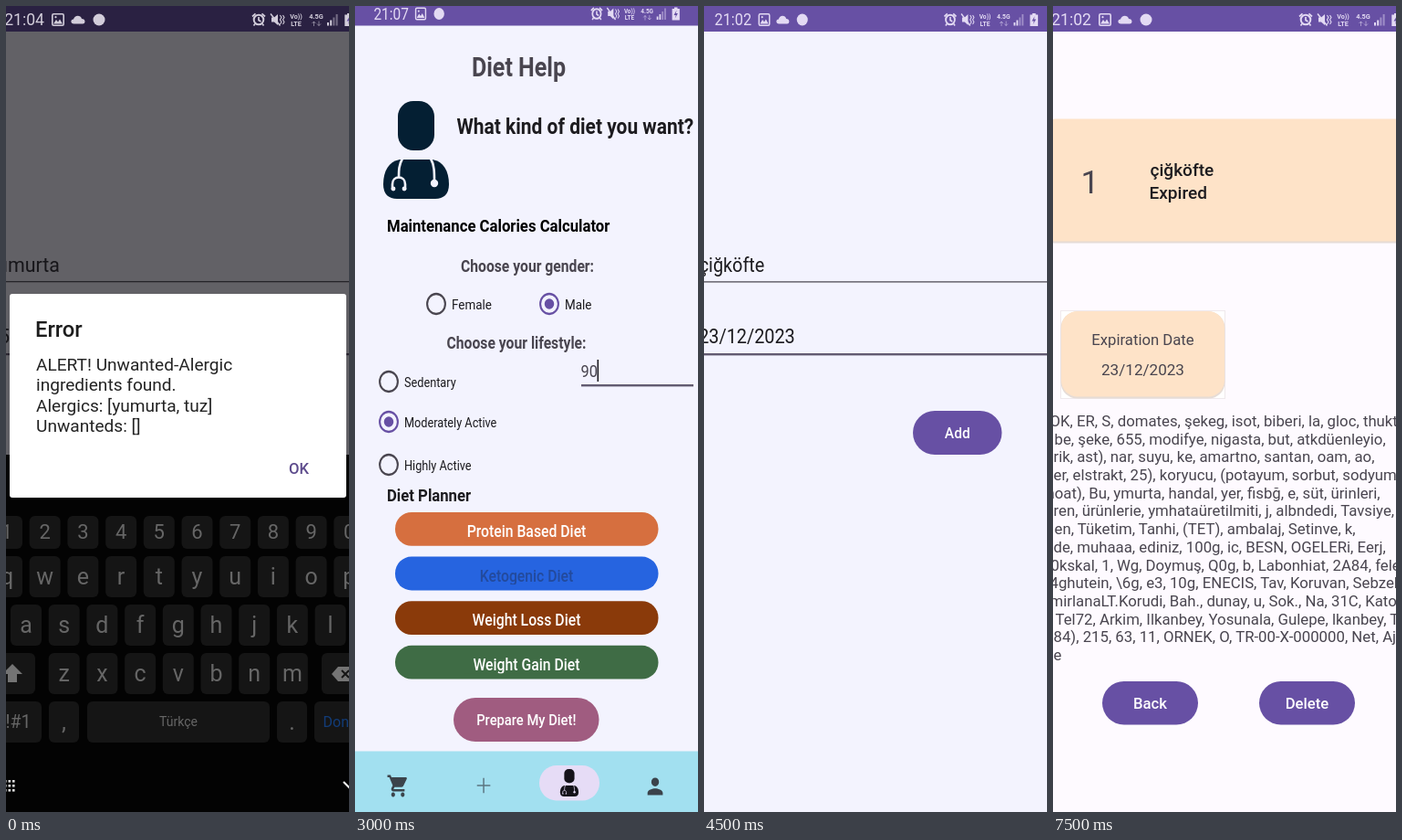
Recreate the animation shown at these times as an HTML page. Size 376x882 px, loop 8 s.

```html
<!DOCTYPE html>
<html lang="en">
<head>
<meta charset="utf-8">
<title>App screens</title>
<style>
html, body { margin: 0; width: 100%; height: 100%; overflow: hidden; background: #f3f3fe; }
svg { display: block; width: 376px; height: 882px; font-family: Roboto, sans-serif; }
text { white-space: pre; }
</style>
</head>
<body>
<svg id="stage" viewBox="0 0 376 882" xmlns="http://www.w3.org/2000/svg"></svg>
<script>
const PURPLE = '#6750a4', INK = '#1c1b1f', SOFT = '#49454f', PALE = '#f3f3fe', ROSE = '#fefaff';

// Horizontal scale of the screen being built
let sx = 1;

const rect = (x, y, w, h, fill, r = 0, more = '') =>
  `<rect x="${x}" y="${y}" width="${w}" height="${h}" rx="${r}" fill="${fill}" ${more}/>`;
const path = (d, fill, more = '') => `<path d="${d}" fill="${fill}" ${more}/>`;
const line = (d, color, w, more = '') =>
  path(d, 'none', `stroke="${color}" stroke-width="${w}" ${more}`);
const dot = (x, y, r, fill) => `<circle cx="${x}" cy="${y}" r="${r}" fill="${fill}"/>`;
const at = (x, y, kx, ky, body) => `<g transform="translate(${x} ${y}) scale(${kx} ${ky})">${body}</g>`;
const text = (x, y, size, str, fill = INK, weight = 400, anchor = 'start') =>
  at(x, y, sx, 1, `<text font-size="${size}" fill="${fill}" font-weight="${weight}" text-anchor="${anchor}">${str}</text>`);
const mid = (x, y, size, str, fill, weight) => text(x, y, size, str, fill, weight, 'middle');
const button = (x, y, w, h, label, size = 16.7, fill = PURPLE) =>
  rect(x, y, w, h, fill, h / 2) + mid(x + w / 2, y + h / 2 + size * .37, size, label, '#fff', 500);

const icons = {
  image: c => rect(-6.2, -6.2, 12.4, 12.4, 'none', 1.5, `stroke="${c}" stroke-width="1.6"`) +
    path('M-5 4.5L-2 0L0 2.5L2 -.5L5 4.5Z', c) + dot(-2.5, -2.8, 1.1, c),
  cloud: c => path('M-4.5 4.5C-8.5 4.5 -8.5 -.5 -5 -.5C-4 -5.5 3 -5.5 4 -1C8.5 -1 8.5 4.5 5 4.5Z', c),
  spot: c => dot(0, 0, 6.5, c),
  alarm: c => `<circle r="5.3" fill="none" stroke="${c}" stroke-width="2"/>` +
    line('M0 -3V.5L2.5 2M-7 -3.5L-3.5 -6.7M7 -3.5L3.5 -6.7M-4 4.5L-5.5 6.5M4 4.5L5.5 6.5', c, 1.7),
  mute: c => path('M-6 -2.5H-3L1 -6V6L-3 2.5H-6Z', c) +
    line('M-7 -6.5L3.5 6.5', c, 1.5) + line('M3.5 -5L5 -2.5L3.5 0L5 2.5L3.5 5M6.5 -5L8 -2.5L6.5 0L8 2.5L6.5 5', c, 1.1),
  volte: c => `<g font-size="7.2" font-weight="700" fill="${c}" text-anchor="middle"><text y="-.8">Vo))</text><text y="7">LTE</text></g>`,
  net: c => `<text y="-.6" font-size="7.4" font-weight="700" fill="${c}" text-anchor="middle">4.5G</text>` +
    line('M-2.5 7V2M-4.5 4L-2.5 2L-.5 4M3 1.5V6.5M1 4.5L3 6.5L5 4.5', c, .9, 'opacity=".6"'),
  signal: c => rect(-6, 3, 2, 3.5, c) + rect(-2.8, .5, 2, 6, c) +
    rect(.4, -2.5, 2, 9, c, 0, 'opacity=".45"') + rect(3.6, -6, 2, 12.5, c, 0, 'opacity=".45"'),
  battery: c => path('M-2 -7H2V-5.5H4.7V7H-4.7V-5.5H-2Z', c) + path('M1 -4L-2.5 1.5H0L-1 5L2.5 -.5H0Z', PURPLE)
};

function status(time, left, { off = 0, dy = 0, bar = PURPLE, color = '#e3daf3' } = {}) {
  const right = { alarm: 277, mute: 297, volte: 318, net: 340, signal: 358, battery: 376 };
  const put = ([name, x]) => at(off + sx * x, 15 + dy, sx, 1, icons[name](color));
  return rect(0, 0, 376, 28 + dy, bar) +
    text(off + sx * 42, 21 + dy, 17.6, time, color, 400, 'end') +
    Object.entries({ ...left, ...right }).map(put).join('');
}

function keyboard() {
  const KEY = '#151515', GLYPH = '#666';
  let out = rect(0, 491, 376, 391, '#030303');
  const key = (x, y, w, h, label, size = 25, c = GLYPH) =>
    rect(x, y, w, h, KEY, 6) + mid(x + w / 2, y + h / 2 + size * .34, size, label, c);
  const row = (chars, x, y, h, size) =>
    [...chars].forEach((ch, i) => out += key(x + i * 41.7 - 17, y, 34, h, ch, size));
  row('1234567890', 1, 558, 36, 22);
  row('qwertyuiop', 1, 602, 45);
  row('asdfghjkl', 22, 655, 45);
  row('zxcvbnm', 63.7, 708, 45);
  out += rect(-20, 708, 52, 45, KEY, 6) + path('M7 720L18 731H12V740H2V731H-4Z', '#747474');
  out += rect(346, 708, 50, 45, KEY, 6) + path('M357 731L364 723H384V739H364Z', '#747474') +
    line('M368 727L376 735M376 727L368 735', KEY, 2);
  out += rect(-20, 761, 59, 45, KEY, 6) + text(27.5, 790, 19.5, '!#1', GLYPH, 400, 'end');
  out += key(47, 761, 33, 45, ',') + key(89, 761, 200, 45, 'Türkçe', 14) + key(297, 761, 33, 45, '.');
  out += rect(338, 761, 60, 45, KEY, 6) + text(347.5, 789, 16, 'Done', '#123c78');
  for (let i = 0; i < 9; i++) out += rect(-2 + i % 3 * 4.5, 847 + (i / 3 | 0) * 5, 2.6, 2.6, '#ddd');
  return out + line('M370 849L377 856L384 849', '#eee', 2.2);
}

function alertScreen() {
  sx = 1;
  const body = ['ALERT! Unwanted-Alergic', 'ingredients found.', 'Alergics: [yumurta, tuz]', 'Unwanteds: []'];
  return rect(0, 0, 376, 882, '#626166') +
    status('21:04', { image: 57, cloud: 79, spot: 102 }, { bar: '#2a2142', color: '#d2cdda' }) +
    text(-20, 290.5, 21.4, 'yumurta', '#17161a') + rect(0, 301, 376, 1.3, '#252429') +
    text(4, 369, 21.4, '5', '#17161a', 400, 'end') + rect(0, 380, 376, 2.2, '#2b2631') +
    keyboard() +
    rect(4, 315, 369, 223, '#fff', 3) +
    text(32, 362, 23.8, 'Error', '#1d1d1d', 500) +
    body.map((s, i) => text(33, 398.5 + i * 22.6, 19.1, s, '#242424')).join('') +
    mid(321, 511.5, 16.7, 'OK', '#5d4b8c', 500);
}

function planScreen() {
  sx = .844;
  const lines = `Morning: Scrambled eggs with avocado and
spinach, black coffee with heavy cream.

Noon: Grilled chicken salad with mixed
greens, cherry tomatoes, cucumber, and
olive oil dressing.

Evening: Baked salmon with broccoli and
cauliflower rice, topped with butter.

Remember, as a male on a ketogenic diet
with a moderately active lifestyle and
weighing 90 kilograms, it is important to
focus on consuming adequate protein and
healthy fats while restricting carbohydrates.
This nutrition plan should help you maintain
ketosis and support your overall health and
fitness goals.`.split('\n');
  return rect(0, 0, 376, 882, ROSE) + rect(0, 0, 376, 7, PURPLE) +
    lines.map((s, i) => text(0, 31.5 + i * 26.35, 22.5, s, SOFT)).join('');
}

function doctor(dark, light) {
  return rect(47, 104, 40, 54, dark, 17) +
    path('M49 168H85C97 170 103 181 103 195C103 206 97 211 88 211H46C37 211 31 206 31 195C31 181 37 170 49 168Z', dark) +
    line('M52 167C48 174 48 180 48 187M41 201V195C41 185 55 185 55 195V201M83 167C87 174 87 182 87 192', light, 2.6) +
    dot(42, 200, 2.4, light) + dot(54, 200, 2.4, light) + dot(87, 194, 4.2, light);
}

function radio(x, y, on) {
  const c = on ? PURPLE : SOFT;
  return at(x, y, .9, 1, `<circle r="11" fill="none" stroke="${c}" stroke-width="2.3"/>` + (on ? dot(0, 0, 5.8, c) : ''));
}

function dietScreen() {
  sx = .877;
  const options = [[89, 326, 'Female', 15.3, 106], [213, 326, 'Male', 15.3, 230, 1], [37, 411, 'Sedentary', 14.5, 54],
    [37, 455, 'Moderately Active', 14.5, 54, 1], [37, 502, 'Highly Active', 14.5, 54]];
  const diets = [['Protein Based Diet', '#d66f3f'], ['Ketogenic Diet', '#2664e0', '#234a9c'],
    ['Weight Loss Diet', '#8a3a0a'], ['Weight Gain Diet', '#3f6c45']];
  // The label's descenders are cut off by its box
  const diet = ([label, fill, ink = '#fff'], i) => {
    const y = 554 + i * 48.6;
    return rect(44, y, 288.5, 36.8, fill, 18) + mid(188, y + 27, 18, label, ink, 500) +
      rect(120, y + 30.5, 136, 4, fill);
  };
  const icon = (x, y, d, c) => at(x - 12.5, y - 14.3, 1.045, 1.19, path(d, c));
  return rect(0, 0, 376, 882, PALE) +
    status('21:07', { image: 57, spot: 80 }, { off: 22, dy: -6.5 }) +
    mid(179.5, 76.5, 28.6, 'Diet Help', SOFT, 700) +
    doctor('#041f33', PALE) +
    text(111.5, 139.5, 23.9, 'What kind of diet you want?', INK, 700) +
    text(35, 246.5, 19.05, 'Maintenance Calories Calculator', '#000', 700) +
    mid(189, 291, 17.9, 'Choose your gender:', SOFT, 700) +
    mid(177, 374.5, 17.9, 'Choose your lifestyle:', SOFT, 700) +
    options.map(([x, y, s, size, tx, on]) => radio(x, y, on) + text(tx, y + 5.5, size, s)).join('') +
    text(247.5, 406, 18.7, '90', SOFT) + rect(265.5, 387, 1.6, 24, INK) + rect(248, 414, 123, 2.4, '#625b71') +
    text(35, 541.5, 19.05, 'Diet Planner', INK, 700) +
    diets.map(diet).join('') +
    button(108, 757, 159.5, 48, 'Prepare My Diet!', 16.8, '#a05c80') +
    rect(0, 815.5, 376, 67, '#a2e0f0') + rect(202, 831, 66, 38.5, '#e6dcf6', 19) +
    icon(47, 853.5, 'M7 18a2 2 0 1 0 .01 0zM1 2v2h2l3.6 7.6-1.4 2.4C4.5 15.4 5.5 17 7 17h12v-2H7.4l1.1-2h7.5c.75 0 1.4-.4 1.7-1L21.3 5.5C21.7 4.8 21.2 4 20.4 4H5.2l-.9-2zM17 18a2 2 0 1 0 .01 0z', '#3b434b') +
    icon(141, 853, 'M19 12.7H12.7V19H11.3V12.7H5V11.3H11.3V5H12.7V11.3H19Z', '#5b7580') +
    at(216.2, 805.9, .28, .28, doctor('#15131a', '#e6dcf6')) +
    icon(329, 854, 'M12 12a4 4 0 1 0 0-8a4 4 0 0 0 0 8zM12 14c-2.7 0-8 1.3-8 4v2h16v-2c0-2.7-5.3-4-8-4z', '#3b434b');
}

function addScreen() {
  sx = .927;
  return rect(0, 0, 376, 882, PALE) +
    status('21:02', { image: 57, cloud: 79, spot: 102 }, { off: 13.2 }) +
    text(-5.3, 290.5, 21.4, 'çiğköfte') + rect(0, 301.3, 376, 1.2, '#44414a') +
    text(-5.8, 369, 21.4, '23/12/2023') + rect(0, 380, 376, 2.4, '#625b71') +
    button(229, 443, 97.5, 48, 'Add');
}

function homeScreen() {
  sx = 1;
  const field = (y, s) => text(-6, y, 21.5, s, '#a19fa9') + rect(0, y + 10.3, 376, 1.3, '#55525c');
  const house = path('M12 3L4 9V21H20V9Z', '#000') +
    path('M12.5 12.5c0 .83-.67 1.5-1.5 1.5v4h-1v-4c-.83 0-1.5-.67-1.5-1.5v-3h1v3h.5v-3h1v3h.5v-3h1zM15 18h-1v-3.5h-1v-3c0-1.1.9-2 2-2z', PALE);
  return rect(0, 0, 376, 882, PALE) +
    status('20:58', { cloud: 56, spot: 79 }) +
    mid(187.5, 178, 60.2, 'Food Tracker', SOFT, 700) +
    at(92.4, 258.5, 7.96, 7.96, house) +
    field(548.5, 'Enter Allergens') + field(613, 'Enter Unwanted Ingredients') +
    button(135, 723, 105, 56, 'OK', 18.5);
}

function detailScreen() {
  sx = 1;
  const CARD = '#fee3c8';
  const shade = (x, y, w, h, r) =>
    rect(x - .5, y + .5, w + 1, h + 1.5, '#e6dcd6', r) + rect(x, y, w, h, CARD, r);
  const body = [
    [-4, 'OK, ER, S, domates, şekeg, isot, biberi, la, gloc, thukt'],
    [1, 'be, şeke, 655, modifye, nigasta, but, atkdüenleyio,'],
    [0, 'rik, ast), nar, suyu, ke, amartno, santan, oam, ao,'],
    [0, 'er, elstrakt, 25), koryucu, (potayum, sorbut, sodyum,'],
    [-8, 'noat), Bu, ymurta, handal, yer, fisbğ, e, süt, ürinleri,'],
    [0, 'ren, ürünlerie, ymhataüretilmiti, j, albndedi, Tavsiye,'],
    [1, 'en, Tüketim, Tanhi, (TET), ambalaj, Setinve, k,'],
    [0, 'de, muhaaa, ediniz, 100g, ic, BESN, OGELERi, Eerj,'],
    [-3, '0kskal, 1, Wg, Doymuş, Q0g, b, Labonhiat, 2A84, fele'],
    [-4, '4ghutein, \\6g, e3, 10g, ENECIS, Tav, Koruvan, Sebzele'],
    [-4, 'mirlanaLT.Korudi, Bah., dunay, u, Sok., Na, 31C, Kato'],
    [2, 'Tel72, Arkim, Ilkanbey, Yosunala, Gulepe, lkanbey, T'],
    [0, '84), 215, 63, 11, ORNEK, O, TR-00-X-000000, Net, Aj'],
    [0, 'e']];
  return rect(0, 0, 376, 882, ROSE) +
    status('21:02', { image: 57, cloud: 79, spot: 102 }) +
    shade(-3, 123.5, 386, 134, 5) +
    text(30.5, 205, 35.7, '1', SOFT) +
    text(106.5, 185.5, 19.05, 'çiğköfte', INK, 500) + text(105.5, 211, 19.05, 'Expired', INK, 500) +
    rect(8.5, 333.5, 180, 96, '#fff', 0, 'stroke="#efe9ec"') + shade(9, 334, 179, 93.5, 18) +
    mid(98.5, 371, 16.7, 'Expiration Date', SOFT) + mid(98.5, 404, 17.1, '23/12/2023', SOFT) +
    body.map(([x, s], i) => text(x + .5, 460 + i * 19.69, 16.77, s, SOFT)).join('') +
    button(54, 739, 105, 47.5, 'Back') + button(226, 739, 105, 47.5, 'Delete');
}

const STEP = 1500, LOOP = 8000;
const stage = document.getElementById('stage');
stage.innerHTML = [alertScreen, planScreen, dietScreen, addScreen, homeScreen, detailScreen]
  .map(make => `<g>${make()}</g>`).join('');
const screens = [...stage.children];

function show(ms) {
  const current = Math.floor(ms % LOOP / STEP);
  screens.forEach((g, i) => g.setAttribute('display', i === current ? 'inline' : 'none'));
}

let start;
function tick(now) {
  start ??= now;
  show(now - start);
  requestAnimationFrame(tick);
}
show(0);
requestAnimationFrame(tick);
</script>
</body>
</html>
```
